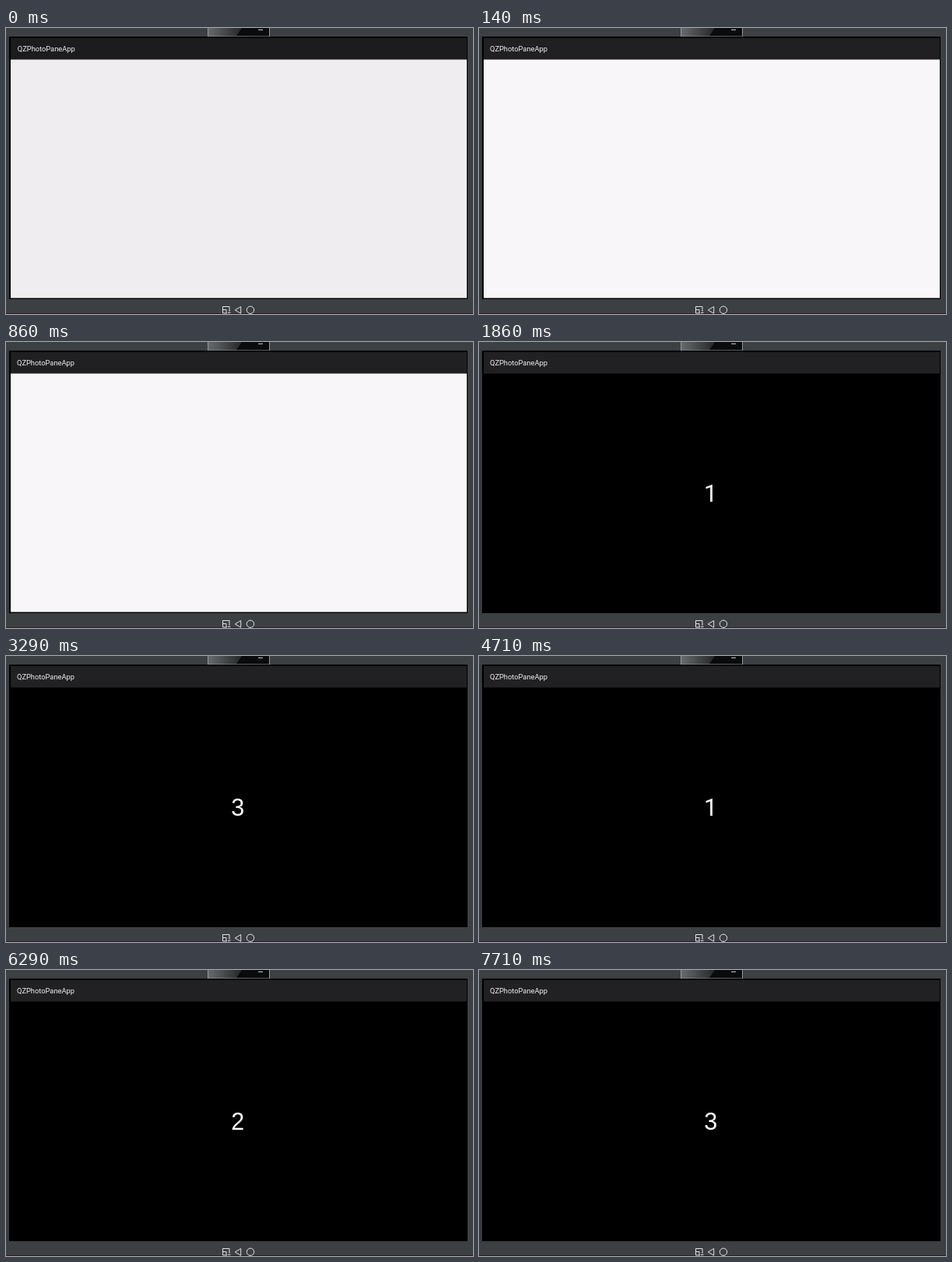
An HTML page that plays this animation: 600x367 px, repeating every 8000 ms.

```html
<!DOCTYPE html>
<html lang="en">
<head>
<meta charset="utf-8">
<title>Image view</title>
<style>
  html, body { margin: 0; width: 100%; height: 100%; overflow: hidden; background: #3d4042; }
  svg { display: block; width: 600px; height: 367px; }
  .icon { fill: none; stroke: #e2e2e2; stroke-width: 1; }
  #title { font: 9.3px Roboto, sans-serif; fill: #f0f0f0; }
  #digit { font: 30.5px "Liberation Sans", sans-serif; fill: #fff; text-anchor: middle; }
  #digit.one { font-family: Roboto, sans-serif; }
</style>
</head>
<body>
<svg viewBox="0 0 600 367">
  <defs>
    <linearGradient id="glass">
      <stop offset="0" stop-color="#686b6d"/>
      <stop offset=".5" stop-color="#2b2d2e"/>
      <stop offset="1" stop-color="#161718"/>
    </linearGradient>
  </defs>

  <!-- device body -->
  <rect width="600" height="367" fill="#3d4042"/>
  <rect y="11" width="4" height="337" fill="#363b3f"/>
  <rect y="366" width="600" height="1" fill="#2b1c2b"/>

  <!-- camera -->
  <rect x="259.5" y="-1" width="79" height="12" fill="url(#glass)" stroke="#94979a"/>
  <path d="M303 0H338V10H296Z" fill="#0a0b0c"/>
  <path d="M324 2.3H330" stroke="#d5d5d5"/>

  <!-- screen -->
  <rect x="4" y="11" width="589" height="337" fill="#000"/>
  <rect id="page" x="6" y="40" width="586" height="306.5"/>
  <rect id="bar" x="6" y="13" width="586" height="27.5"/>
  <text id="title">QZPhotoPaneApp</text>
  <text id="digit" x="297.7" y="204.6"></text>

  <!-- navigation -->
  <g class="icon">
    <path d="M278.5 362V357.5H287V364M278.5 361.5H283V366M278.5 361.5V366H284M285 365.5H288.5"/>
    <path d="M301.7 357.5V366.3L294.3 361.9Z"/>
    <circle cx="314" cy="361.8" r="4.7"/>
  </g>
</svg>
<script>
  const LOOP = 8000;
  const steps = [
    { at: 0, page: '#efedf0', bar: '#1c1c1e', x: 14.8, y: 30.2, digit: '' },
    { at: 140, page: '#f8f6f9', bar: '#201f22', x: 14, y: 29.6, digit: '' },
    { at: 1860, page: '#000', bar: '#212023', x: 14, y: 29.6, digit: '1' },
    { at: 2000, digit: '2' },
    { at: 3290, digit: '3' },
    { at: 4710, digit: '1' },
    { at: 6290, digit: '2' },
    { at: 7710, digit: '3' }
  ];
  steps.forEach((step, i) => { steps[i] = { ...steps[i - 1], ...step }; });

  const [page, bar, title, digit] =
    ['page', 'bar', 'title', 'digit'].map(id => document.getElementById(id));
  let shown;

  function show(step) {
    page.setAttribute('fill', step.page);
    bar.setAttribute('fill', step.bar);
    title.setAttribute('x', step.x);
    title.setAttribute('y', step.y);
    digit.textContent = step.digit;
    digit.classList.toggle('one', step.digit === '1');
  }

  const start = performance.now();
  function tick() {
    const t = (performance.now() - start) % LOOP;
    const step = steps.findLast(s => s.at <= t);
    if (step !== shown) show(shown = step);
    requestAnimationFrame(tick);
  }
  tick();
</script>
</body>
</html>
```
